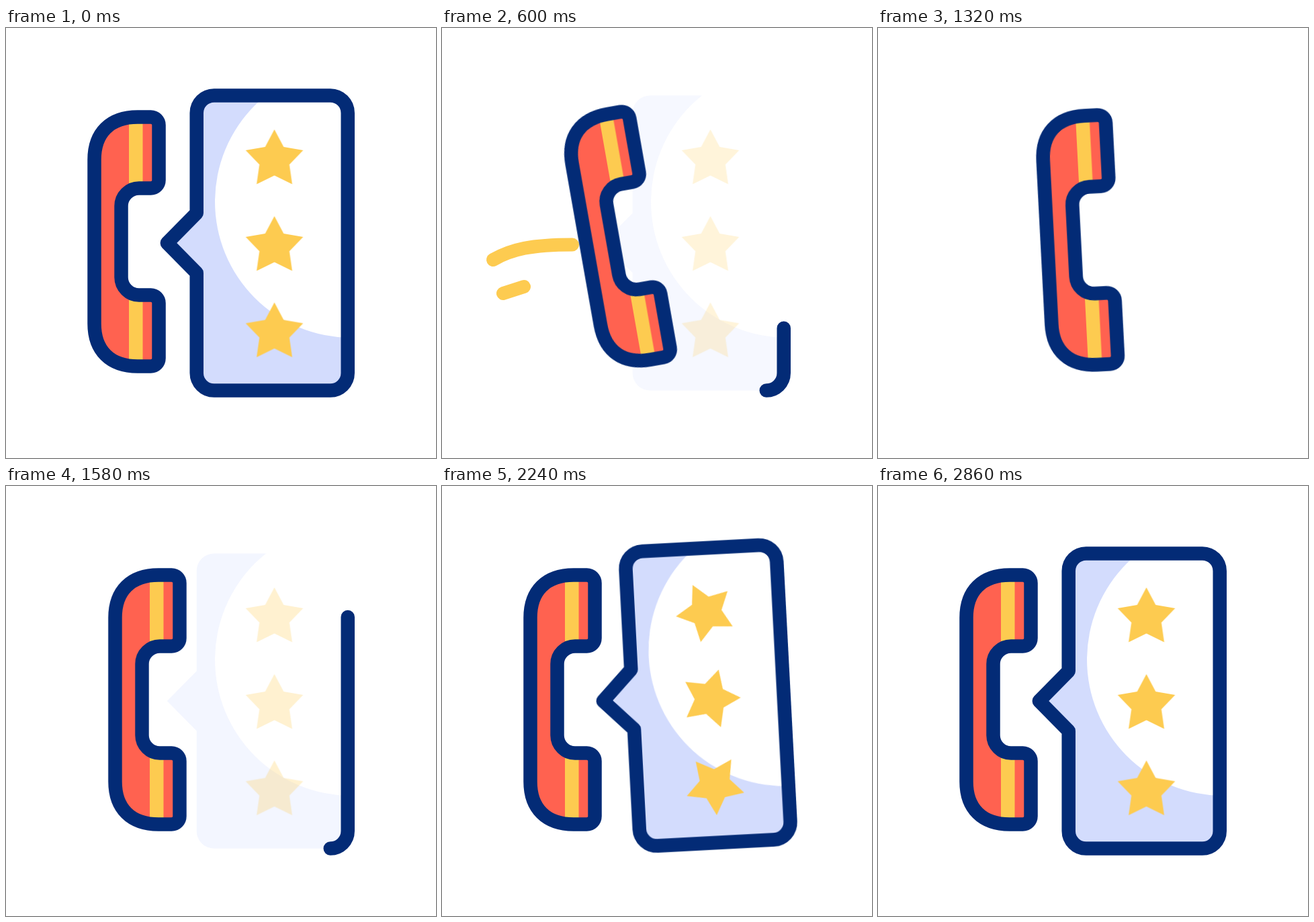
An HTML page for the animation above (3300 ms loop, 640x640 px).

```html
<!DOCTYPE html>
<html lang="en">
<head>
<meta charset="utf-8">
<title>Call rating</title>
<style>
  html, body { margin: 0; width: 100%; height: 100%; overflow: hidden; background: #fff; }
  svg { display: block; width: 100vw; height: 100vh; }

  /* The easing applies between each pair of keyframes. */
  .panel, .outline, .fade, .slide, .tilt, .trail, .star {
    animation-duration: 3300ms;
    animation-iteration-count: infinite;
    animation-timing-function: cubic-bezier(.37, 0, .63, 1);
  }

  .line { fill: none; stroke: #032b76; stroke-width: 20.5; stroke-linecap: round; stroke-linejoin: round; }
  .trail { stroke: #fdcb50; stroke-width: 20; stroke-dasharray: 100 200; animation-name: trail; }
  .outline { stroke-dasharray: 100 200; animation-name: outline; animation-timing-function: cubic-bezier(.455, .03, .515, .955); }
  .fade { animation-name: fade; animation-timing-function: linear; }
  .panel { transform-origin: 239.8px 320px; animation-name: wiggle; }
  .slide { animation-name: slide; }
  .tilt { transform-origin: 155px 318px; animation-name: tilt; }
  .star { fill: #fdcb50; animation-timing-function: cubic-bezier(.62, 0, .02, 1); }
  .one { animation-name: spin1; }
  .two { animation-name: spin2; }
  .three { animation-name: spin3; animation-timing-function: cubic-bezier(.45, 0, .25, 1); }

  @keyframes outline {
    0%, .61% { stroke-dashoffset: 0; }
    23.33%, 40.3% { stroke-dashoffset: 102; }
    60.91%, 100% { stroke-dashoffset: 0; }
  }
  @keyframes fade {
    0%, .61% { opacity: 1; }
    23.03%, 42.42% { opacity: 0; }
    62.88%, 100% { opacity: 1; }
  }
  @keyframes trail {
    0%, 9.09% { stroke-dashoffset: 102; }
    16.36%, 16.97% { stroke-dashoffset: 0; }
    26.06%, 100% { stroke-dashoffset: -102; }
  }
  @keyframes slide {
    0%, 6.97% { transform: translateX(0); }
    27.58%, 34.97% { transform: translateX(145px); }
    53.64%, 100% { transform: translateX(0); }
  }
  @keyframes tilt {
    0%, 1.82% { transform: rotate(0deg); }
    16.97%, 27.88% { transform: rotate(-10deg); }
    47.09%, 100% { transform: rotate(0deg); }
  }
  @keyframes wiggle {
    0%, 59.39% { transform: rotate(0deg); }
    61.82%, 67.88%, 73.94% { transform: rotate(-3deg); }
    64.85%, 70.91%, 76.97% { transform: rotate(3deg); }
    79.39%, 100% { transform: rotate(0deg); }
  }
  @keyframes spin1 {
    0%, 49.73% { transform: rotate(0deg); }
    77.76%, 100% { transform: rotate(360deg); }
  }
  @keyframes spin2 {
    0%, 51.97% { transform: rotate(0deg); }
    82.27%, 100% { transform: rotate(360deg); }
  }
  @keyframes spin3 {
    0%, 56.06% { transform: rotate(0deg); }
    86.67%, 100% { transform: rotate(360deg); }
  }
</style>
</head>
<body>
<svg viewBox="0 0 640 640">
  <defs>
    <path id="bubble" pathLength="100" d="M482.7 539.5A26 26 0 0 0 508.7 513.5V126.5A26 26 0 0 0 482.7 100.5H309.7A26 26 0 0 0 283.7 126.5V275.5L239.8 320L283.7 364.5V513.5A26 26 0 0 0 309.7 539.5H482.7"/>
    <path id="handset" d="M131.5 196C131.5 156 155 132.5 196 132.5H215.5a12 12 0 0 1 12 12V226.5a12 12 0 0 1 -12 12H198A26.5 26.5 0 0 0 171.5 265V371A26.5 26.5 0 0 0 198 397.5H215.5a12 12 0 0 1 12 12V491.5a12 12 0 0 1 -12 12H196C155 503.5 131.5 480 131.5 440Z"/>
    <path id="star" d="M0 -45L13.8 -19L42.8 -13.9L22.3 7.3L26.5 36.4L0 23.5L-26.5 36.4L-22.3 7.3L-42.8 -13.9L-13.8 -19Z"/>
    <clipPath id="body"><use href="#handset"/></clipPath>
    <mask id="shade" maskUnits="userSpaceOnUse" x="0" y="0" width="640" height="640">
      <rect width="640" height="640" fill="#fff"/>
      <circle cx="513.5" cy="258.5" r="202.5"/>
    </mask>
  </defs>

  <g class="panel">
    <g class="fade"><use href="#bubble" fill="#d3dcfd" mask="url(#shade)"/></g>
    <g transform="translate(399.5 196)"><g class="fade"><use class="star one" href="#star"/></g></g>
    <g transform="translate(399.5 325)"><g class="fade"><use class="star two" href="#star"/></g></g>
    <g transform="translate(399.5 453.5)"><g class="fade"><use class="star three" href="#star"/></g></g>
    <use class="line outline" href="#bubble"/>
  </g>

  <path class="line trail" pathLength="100" d="M71 348C100 330 130 322.5 194 322.5"/>
  <path class="line trail" pathLength="100" d="M89.5 395.5L122 385"/>

  <g class="slide">
    <g class="tilt">
      <use href="#handset" fill="#ff6250"/>
      <rect x="183" y="130" width="20.5" height="376" fill="#fdcb50" clip-path="url(#body)"/>
      <use class="line" href="#handset"/>
    </g>
  </g>
</svg>
</body>
</html>
```
